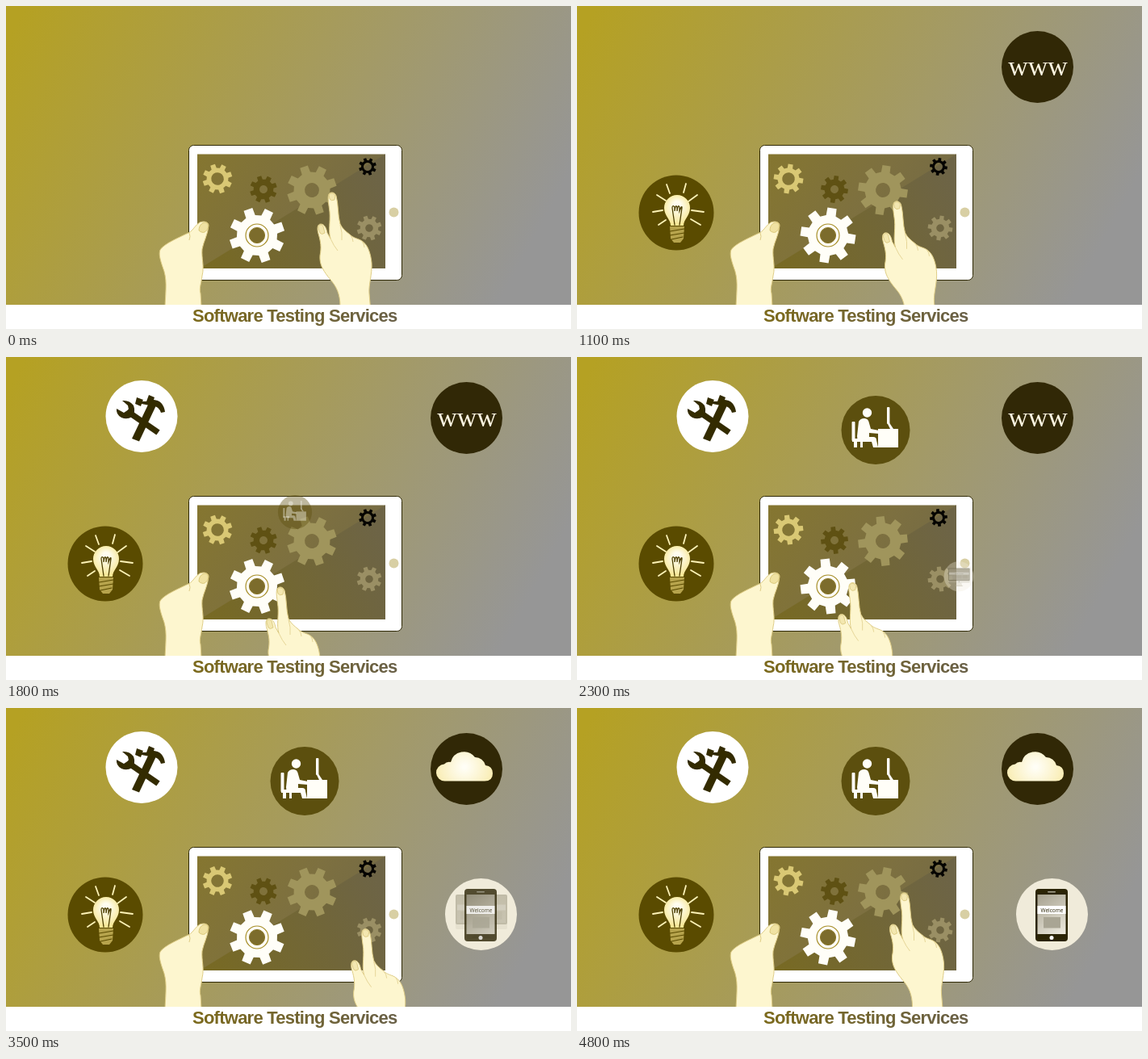
An HTML page with a canvas for the animation above (4.9 s loop, 700 px wide and 400 px high).

```html
<!DOCTYPE html>
<html lang="en">
<head>
<meta charset="utf-8">
<title>Software Testing Services</title>
<style>
html, body { margin: 0; width: 100%; height: 100%; overflow: hidden; background: #fff; }
canvas { display: block; width: 700px; height: 400px; }
</style>
</head>
<body>
<canvas id="stage" width="700" height="400"></canvas>
<script>
const ctx = document.getElementById('stage').getContext('2d');
const LOOP = 4900, STEP = 100, TAU = Math.PI * 2;
const CREAM = '#fdf6cf', DARK = '#332b00', INK = '#2b2405';

const clamp = v => Math.max(0, Math.min(1, v));
const mix = (a, b, k) => a + (b - a) * k;
const progress = (t, from, to) => clamp((t - from) / (to - from));

function linear(x0, y0, x1, y1, ...colors) {
  const g = ctx.createLinearGradient(x0, y0, x1, y1);
  colors.forEach((c, i) => g.addColorStop(i / (colors.length - 1), c));
  return g;
}

function disc(x, y, r, fill) {
  ctx.beginPath();
  ctx.arc(x, y, r, 0, TAU);
  ctx.fillStyle = fill;
  ctx.fill();
}

function ring(x, y, r, color, width) {
  ctx.beginPath();
  ctx.arc(x, y, r, 0, TAU);
  ctx.strokeStyle = color;
  ctx.lineWidth = width;
  ctx.stroke();
}

function box(x, y, w, h, fill, r = 0) {
  ctx.beginPath();
  ctx.roundRect(x, y, w, h, r);
  ctx.fillStyle = fill;
  ctx.fill();
}

function shape(d, fill, stroke, width = 1) {
  const p = new Path2D(d);
  if (fill) { ctx.fillStyle = fill; ctx.fill(p); }
  if (stroke) { ctx.strokeStyle = stroke; ctx.lineWidth = width; ctx.stroke(p); }
}

function label(text, x, y, font, fill) {
  ctx.font = font;
  ctx.textAlign = 'center';
  ctx.fillStyle = fill;
  ctx.fillText(text, x, y);
}

function backdrop() {
  ctx.fillStyle = linear(18, 10, 625, 341, '#b5a123', '#a69b5c', '#969696');
  ctx.fillRect(0, 0, 700, 370);
}

function caption() {
  ctx.fillStyle = '#fff';
  ctx.fillRect(0, 370, 700, 30);
  ctx.font = 'bold 22px "Liberation Sans", Arial, sans-serif';
  ctx.letterSpacing = '-0.75px';
  ctx.textAlign = 'left';
  ctx.fillStyle = linear(231, 0, 484, 0, '#7c6a1c', '#696047');
  ctx.fillText('Software Testing Services', 231, 391);
  ctx.letterSpacing = '0px';
}

function tablet() {
  box(226.5, 172.5, 264, 167, '#fff', 6);
  ctx.strokeStyle = '#2e2805';
  ctx.lineWidth = 1;
  ctx.stroke();
  ctx.fillStyle = linear(237, 184, 470, 325, '#857630', '#7d7040', '#6e6648');
  ctx.fillRect(237, 183.5, 233, 141.5);
  shape('M470 183.5V325H240Z', linear(240, 325, 470, 230, '#786a22', '#6d6446'));
  disc(480.5, 255.5, 6, '#d8cfa4');
}

// x, y, radius, hole, colour
const gears = [
  [262, 214, 18.5, 7.8, '#d9c874'],
  [319, 227, 17, 5, '#5f5113'],
  [379, 228, 31, 9, '#a0955c'],
  [448, 199, 11, 5, '#050400'],
  [450, 275, 15.5, 4.8, '#9a8f64'],
  [311, 284, 34.5, 14, '#fffef8']
];

function gear([x, y, r, hole, color], t) {
  ctx.save();
  ctx.translate(x, y);
  ctx.rotate((-19 + t * 0.025) * Math.PI / 180);
  ctx.beginPath();
  for (let i = 0; i < 8; i++) {
    const a = i * TAU / 8 - TAU / 4;
    for (const [off, k] of [[-.24, .73], [-.165, 1], [.165, 1], [.24, .73]])
      ctx.lineTo(Math.cos(a + off) * r * k, Math.sin(a + off) * r * k);
  }
  ctx.closePath();
  ctx.moveTo(hole, 0);
  ctx.arc(0, 0, hole, 0, TAU);
  ctx.fillStyle = color;
  ctx.fill('evenodd');
  ctx.restore();
}

function hub(x, y) {
  disc(x, y, 14, '#fffef8');
  ring(x, y, 14, '#a8902a', 1.2);
  disc(x, y, 9.6, '#7c6c2c');
  ring(x, y, 9.6, '#8d7a28', 1);
}

function bulb() {
  disc(123, 256, 46.5, '#5a4b00');
  ctx.lineCap = 'round';
  shape('M111 221l4 11M135 220l-3 11M99 234l11 7M149 234l-11 8M94 255l12-2M157 255l-15-2M101 271l9-6M153 271l-12-7',
    null, '#fdf3b8', 1.8);
  const glow = ctx.createRadialGradient(124, 246, 4, 124, 252, 21);
  glow.addColorStop(0, '#fffdf0');
  glow.addColorStop(1, '#f6e58c');
  shape('M116 272C116 264 108 260 108 250A16 16 0 0 1 140 250C140 260 132 264 132 272Z', glow);
  shape('M121 271L118 250Q118 246 121 249V254Q122 245 124 249V254Q125 245 127 249V254Q130 246 130 250L127 271',
    null, '#4b3e00', 1.3);
  shape('M115 273H133L132 288L128 293H120L116 288Z', '#b6a34c');
  shape('M115 279L133 276M115 284L133 281M117 289L131 286', null, '#5a4b00', 1.2);
  ctx.lineCap = 'butt';
}

function web(fade) {
  disc(570.5, 75.5, 44.5, '#312806');
  const alpha = ctx.globalAlpha;
  if (fade > 0) {
    ctx.globalAlpha = alpha * fade;
    const g = ctx.createRadialGradient(568, 73, 2, 568, 73, 36);
    g.addColorStop(0, '#fffef6');
    g.addColorStop(1, '#f9edb4');
    shape('M544 90.5A10.5 10.5 0 0 1 543 69.5Q546 66 551 67A17 17 0 0 1 581 61A13 13 0 0 1 594 71Q603 72 603 81Q603 90.5 593 90.5Z', g);
  }
  ctx.globalAlpha = alpha * (1 - fade);
  label('www', 571, 85.5, '34px "Liberation Serif", "Times New Roman", serif', '#fdf6e2');
  ctx.globalAlpha = alpha;
}

function tools() {
  disc(168, 73.5, 44.5, '#fff');
  // hammer
  shape('M177 57L186 60L165 104.5L156 101Z', DARK);
  shape('M162 50L170 53L169 55L174 55L177 47L184 50L183 53Q195 54 197 68L192 69Q189 61 183 61L168 58L167 61L160 58Z', DARK);
  // wrench
  shape('M150 67L188.5 93.5', null, DARK, 7.5);
  shape('M144 54Q153 53 158 60Q161 68 156 74Q150 78 143 75Q136 71 137 64L146 69L152 65L151 60Z', DARK);
}

function worker() {
  const w = '#fffef8';
  disc(370, 90.5, 42.5, '#5c4f0e');
  disc(359.5, 69, 5.7, w);
  shape('M349 80Q351 76 356 76Q361 76 362 82L364 89L374 91V95L362 94V99H367Q371 99 371 103L373 112H367L365 105H352Q347 104 347 98Z', w);
  box(340.5, 80, 4, 24, w, 1);
  shape('M341 101H356V105H354V112H351V105H347V112H343V105H341Z', w);
  box(373, 89, 25, 23, w);
  box(384, 62, 3.4, 21, w, 1);
  shape('M386 80L392 89H388L385 83Z', w);
}

function desktop() {
  box(557, 231, 64, 43, '#bdb7a1', 2);
  box(557, 231, 64, 37, INK, 2);
  box(559, 233, 60, 33, linear(0, 233, 0, 266, '#cfc9b4', '#e9e5d8'));
  box(559, 243.5, 60, 7, '#fff');
  label('Welcome', 589, 249, '6px "Open Sans", sans-serif', INK);
  for (const x of [563, 582, 600]) box(x, 252, 14.5, 10, '#a9a38f');
  disc(589, 271, 1.4, INK);
  shape('M582 274H596L599 284H579Z', '#c9c3af');
  box(577, 283, 24, 2, '#aaa48e', 1);
}

function phone() {
  box(568, 224, 40, 65, INK, 4);
  box(570.5, 231, 35, 49, linear(570, 231, 605, 280, '#a5a08e', '#eeebdf'));
  box(570.5, 245, 35, 10, '#fff');
  label('Welcome', 588.5, 252.5, '6.5px "Open Sans", sans-serif', INK);
  box(578, 259, 21, 13.5, '#a9a594');
  box(583, 227, 10, 1.5, '#a9a594', 1);
  disc(588, 284.5, 2.5, '#fff');
}

function device(fade) {
  disc(588.5, 255.5, 44.5, '#f0ebda');
  const alpha = ctx.globalAlpha;
  ctx.globalAlpha = alpha * (1 - fade);
  desktop();
  ctx.globalAlpha = alpha * fade;
  if (fade > 0) phone();
  ctx.globalAlpha = alpha;
}

// An icon flies out of a gear, growing and fading in.
const icons = [
  { draw: bulb, from: [319, 227], to: [123, 256], size: .25, start: 100, end: 600 },
  { draw: t => web(progress(t, 2600, 3100)), from: [356, 253], to: [570.5, 75.5], size: .26, start: 600, end: 1100 },
  { draw: tools, from: [311, 283], to: [168, 73.5], size: .25, start: 1200, end: 1700 },
  { draw: worker, from: [355, 217.5], to: [370, 90.5], size: .37, start: 1700, end: 2200 },
  { draw: t => device(progress(t, 3100, 3600)), from: [450, 275], to: [588.5, 255.5], size: .3, start: 2200, end: 2800 }
];

function icon({ draw, from, to, size, start, end }, t) {
  const k = progress(t, start, end);
  if (!k) return;
  const s = mix(size, 1, k);
  ctx.save();
  ctx.globalAlpha = Math.min(1, k * 2);
  ctx.translate(mix(from[0], to[0], k), mix(from[1], to[1], k));
  ctx.scale(s, s);
  ctx.translate(-to[0], -to[1]);
  draw(t);
  ctx.restore();
}

function leftHand() {
  shape('M197 372C198 350 200 338 194 323C191 314 189 307 191 302C196 294 216 286 228 280C232 277 235 271 240 268C245 266 251 267 251 272C250 283 245 291 243 301C242 313 246 322 243 334C242 344 239 349 241 356L242 372Z',
    CREAM, '#dfcd86');
  shape('M239 278C239 270 245 267 249 268.5C252 272 250 278 246 280C244 281 241 280 239 278Z', '#f0e2a2', '#d3bf6c', .8);
  shape('M227 281Q229 285 227 290', null, '#dfcd86');
}

// time, x, y of the pointing hand
const moves = [
  [0, 0, 0], [600, 0, 0], [1200, -9, 13], [1800, -64, 54], [3000, -60, 41],
  [3600, 62, 43], [4200, 62, 43], [4800, 1.5, -2], [4900, 0, 0]
];

function handAt(t) {
  const i = moves.findIndex(m => m[0] > t);
  const a = moves[i - 1], b = moves[i], k = progress(t, a[0], b[0]);
  return [mix(a[1], b[1], k), mix(a[2], b[2], k)];
}

function rightHand(t) {
  ctx.save();
  ctx.translate(...handAt(t));
  shape('M414 440V372C414 356 409 347 402 339C394 329 388 321 389 309C391 299 390 292 387 282C385 275 386 270 390 270C395 270 397 276 398 281L402 288C399 278 402 268 401 255C400 246 398 237 400 233C402 230 407 230 409 235C412 246 411 260 414 270C417 276 421 279 426 283C431 288 437 288 441 291C449 296 452 308 453 318C454 332 449 345 450 356L452 380V440Z',
    CREAM, '#dfcd86');
  shape('M400 234C402 231 406 231 408 235L407 240Q403 242 401 239Z', '#f3e7b0', '#d8c67a', .8);
  shape('M387 275C387 271 391 269 393 273L395 281Q391 284 389 281Z', '#f3e7b0', '#d8c67a', .8);
  shape('M402 288Q406 297 411 303M414 271Q417 281 416 290M426 283Q430 287 430 292M441 291Q444 295 444 299', null, '#e6d698');
  ctx.restore();
}

function render(t) {
  ctx.clearRect(0, 0, 700, 400);
  backdrop();
  tablet();
  gears.forEach(g => gear(g, t));
  hub(311, 284);
  icons.forEach(i => icon(i, t));
  leftHand();
  rightHand(t);
  caption();
}

const begin = performance.now();
function tick(now) {
  const t = Math.max(0, now - begin) % LOOP;
  render(Math.floor(t / STEP) * STEP);
  requestAnimationFrame(tick);
}
render(0);
requestAnimationFrame(tick);
</script>
</body>
</html>
```
